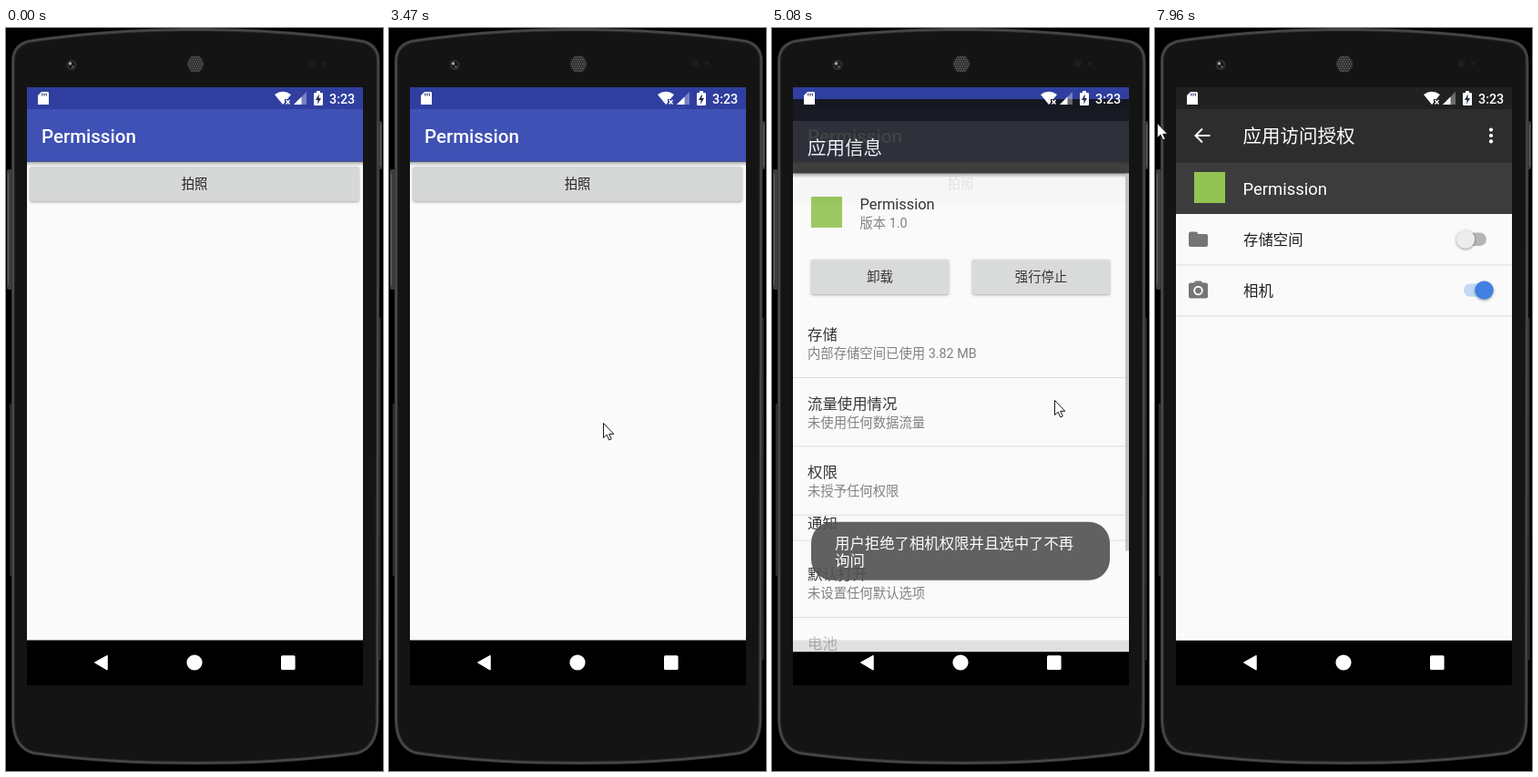
An HTML page with a canvas for the animation above (8000 ms loop, 414 by 815 pixels).

```html
<!DOCTYPE html>
<html lang="zh-CN">
<head>
<meta charset="utf-8">
<title>Permission</title>
<style>
html, body { margin: 0; width: 100%; height: 100%; overflow: hidden; background: #000; }
canvas { display: block; }
</style>
</head>
<body>
<canvas id="stage" width="414" height="815"></canvas>
<script>
const stage = document.getElementById('stage').getContext('2d');
const sheet = document.createElement('canvas');
sheet.width = 414;
sheet.height = 815;
const buffer = sheet.getContext('2d');
let c = stage;

const LOOP = 8000;
const FONT = 'Roboto, "Noto Sans CJK SC", "Noto Sans CJK", sans-serif';
const INK = '#212121', GREY = '#757575', BLUE = '#4285f4', LINK = '#4a82e2', PINK = '#e85587', GREEN = '#92c353';
const BAR = 146.5, FOOT = 671.5;

// Pointer stops: time, x, y
const stops = [
  [70, 346, 674], [690, 200, 170], [1180, 200, 170], [1550, 174, 477], [1780, 134, 422],
  [2060, 121, 398], [2200, 121, 398], [2500, 205, 437], [2830, 307, 432], [2950, 307, 432],
  [3150, 235, 433], [3600, 235, 433], [4140, 310, 408], [5300, 310, 408], [6020, 167, 474],
  [6660, 167, 474], [7230, 345, 290], [7380, 345, 290], [7540, 312, 321], [7940, 2, 104]
];
const clicks = [[730, 980], [2080, 2230], [3160, 3310], [4310, 4450], [6030, 6200], [7250, 7400]];

const clamp = v => Math.max(0, Math.min(1, v));
const ramp = (t, a, b) => clamp((t - a) / (b - a));
const easeOut = p => 1 - (1 - p) * (1 - p);
const smooth = p => p * p * (3 - 2 * p);

function rect(x, y, w, h, color) {
  c.fillStyle = color;
  c.fillRect(x, y, w, h);
}
function pill(x, y, w, h, r, color) {
  c.fillStyle = color;
  c.beginPath();
  c.roundRect(x, y, w, h, r);
  c.fill();
}
function disc(x, y, r, color) {
  c.fillStyle = color;
  c.beginPath();
  c.arc(x, y, r, 0, 7);
  c.fill();
}
function poly(points, color) {
  c.beginPath();
  points.forEach(([x, y]) => c.lineTo(x, y));
  c.closePath();
  c.fillStyle = color;
  c.fill();
}
function line(points, color, width) {
  c.beginPath();
  points.forEach(([x, y]) => c.lineTo(x, y));
  c.strokeStyle = color;
  c.lineWidth = width;
  c.stroke();
}
// Text placed by the middle of its capitals
function text(s, x, cy, size, color, weight = 400, align = 'left') {
  c.font = `${weight} ${size}px ${FONT}`;
  c.textAlign = align;
  c.fillStyle = color;
  c.fillText(s, x, cy + size * .37);
}
// Draws a group and fades it as one sheet
function layer(alpha, draw) {
  if (alpha <= 0) return;
  c = alpha < 1 ? buffer : stage;
  if (c === buffer) c.clearRect(0, 0, 414, 815);
  c.save();
  draw();
  c.restore();
  c = stage;
  if (alpha < 1) {
    c.globalAlpha = alpha;
    c.drawImage(sheet, 0, 0);
    c.globalAlpha = 1;
  }
}
function shadowed(blur, dy, alpha, draw) {
  c.save();
  c.shadowColor = `rgba(0,0,0,${alpha})`;
  c.shadowBlur = blur;
  c.shadowOffsetY = dy;
  draw();
  c.restore();
}
function barShadow() {
  const g = c.createLinearGradient(0, BAR, 0, BAR + 5);
  g.addColorStop(0, 'rgba(0,0,0,.34)');
  g.addColorStop(1, 'rgba(0,0,0,0)');
  rect(23, BAR, 369, 5, g);
}
function button(x, y, w, h, label) {
  shadowed(3, 1, .35, () => pill(x, y, w, h, 2, '#d6d7d7'));
  text(label, x + w / 2, y + h / 2, 14.35, INK, 400, 'center');
}

function shell(inset) {
  const l = 6 + inset, r = 410.5 - inset, top = inset, b = 808 - inset;
  c.beginPath();
  c.moveTo(l, 36);
  c.quadraticCurveTo(l, 18 + top, 24, 13 + top);
  c.bezierCurveTo(85, 4 + top, 140, top, 208, top);
  c.bezierCurveTo(276, top, 332, 4 + top, 393, 13 + top);
  c.quadraticCurveTo(r, 18 + top, r, 36);
  c.lineTo(r - 1, 760);
  c.quadraticCurveTo(r - 2, b - 17, 386, b - 11);
  c.bezierCurveTo(330, b - 3, 270, b, 208, b);
  c.bezierCurveTo(146, b, 86, b - 3, 30, b - 11);
  c.quadraticCurveTo(l + 1, b - 17, l, 760);
  c.closePath();
}
function phone() {
  rect(0, 0, 414, 815, '#000');
  pill(1, 155, 6, 132, 2, '#3c3c3c');
  rect(2, 160, 1, 122, '#626262');
  pill(408, 102, 5, 53, 2, '#3c3c3c');
  rect(411, 106, 1, 46, '#5c5c5c');
  rect(4, 412, 2, 189, '#2c2c2c');
  rect(410, 318, 1.5, 375, '#303030');
  ['#343434', '#4c4c4c', '#444', '#242424', '#141414'].forEach((shade, i) => {
    shell(i);
    c.fillStyle = shade;
    c.fill();
  });

  disc(72, 40.5, 5.5, '#2e3033');
  disc(72, 40.5, 3.6, '#15171a');
  disc(70.5, 39, 1.7, '#a4a8ad');
  disc(73.4, 42.4, 1.2, '#62676d');
  disc(208, 39.5, 9.5, '#2a2a2a');
  for (let j = -3; j <= 3; j++)
    for (let i = -4; i <= 4; i++) {
      const x = i * 2.6 + (j & 1) * 1.3, y = j * 2.5;
      if (Math.hypot(x, y) < 9) disc(208 + x, 39.5 + y, .8, '#777');
    }
  disc(336, 39, 4, '#1f1c1c');
  disc(349, 39, 2.4, '#1f1c1c');
}

function camera(x, y, w, color, hole) {
  const h = w * .9, m = x + w / 2, cy = y + h * .555;
  pill(x, y + h * .11, w, h * .89, w * .09, color);
  poly([[x + w * .25, y + h * .12], [x + w * .35, y], [x + w * .65, y], [x + w * .75, y + h * .12]], color);
  disc(m, cy, w * .25, hole);
  disc(m, cy, w * .16, color);
}

function statusIcons() {
  poly([[39, 70], [46, 70], [47, 71], [47, 84], [35, 84], [35, 74]], '#fff');
  for (let i = 0; i < 3; i++) rect(39.2 + i * 2.3, 71.5, 1.1, 3, '#333c70');

  c.fillStyle = '#fff';
  c.beginPath();
  c.moveTo(304, 84);
  c.lineTo(295, 73);
  c.quadraticCurveTo(304, 66.5, 313, 73);
  c.lineTo(309, 78);
  c.lineTo(306, 78);
  c.lineTo(306, 82);
  c.fill();
  line([[307.5, 79], [311.5, 83.5]], '#fff', 1.3);
  line([[311.5, 79], [307.5, 83.5]], '#fff', 1.3);

  poly([[330, 70], [330, 84], [316, 84]], 'rgba(255,255,255,.35)');
  poly([[324.5, 75.5], [324.5, 84], [316, 84]], '#fff');

  pill(338, 71, 10, 14, 1.2, '#fff');
  rect(341, 69, 4, 2.5, '#fff');
  poly([[343.7, 72.5], [340, 79], [342.5, 79], [342.2, 83.5], [346, 77], [343.6, 77]], '#222b50');
  text('3:23', 355, 77.3, 14.35, '#fff', 500);
}
function navIcons() {
  poly([[97, 696], [111.5, 688], [111.5, 704.5]], '#fff');
  line([[97.5, 696], [111, 688.5], [111, 704], [97.5, 696]], '#fff', 1);
  disc(207, 696, 8.6, '#fff');
  pill(302, 688.3, 15.6, 15.6, 1.5, '#fff');
}

// Status bar, title bar and paper shared by two screens
function scene(status, bar, title, weight) {
  rect(23, 65, 369, 24, status);
  rect(23, BAR, 369, FOOT - BAR, '#fafafa');
  rect(23, 89, 369, BAR - 89, bar);
  barShadow();
  text(title, 39, 118.4, 20.5, '#fff', weight);
}
function home() {
  scene('#303f9f', '#3f51b5', 'Permission', 500);
  button(26.5, 152, 361, 38, '拍照');
}

function dialog(x, y, w, h, show, dim, body) {
  if (show <= 0) return;
  rect(23, 65, 369, FOOT - 65, `rgba(0,0,0,${dim * show})`);
  layer(show, () => {
    const s = .92 + .08 * easeOut(show), cx = x + w / 2, cy = y + h / 2;
    c.translate(cx, cy);
    c.scale(s, s);
    c.translate(-cx, -cy);
    shadowed(24, 9, .34, () => pill(x, y, w, h, 2, '#fff'));
    body();
  });
}
function askDialog(t) {
  const show = ramp(t, 1000, 1180) * (1 - ramp(t, 3280, 3450));
  const checked = ramp(t, 2200, 2330);
  dialog(59.5, 293.5, 295, 173.5, show, .43, () => {
    camera(83, 315, 31, BLUE, '#fff');
    text('要允许', 134, 326, 20.5, INK);
    text('Permission', 195.3, 326.6, 20.5, INK, 700);
    const w = c.measureText('Permission').width;
    text('拍', 195.3 + w, 326, 20.5, INK);
    text('摄照片和录制视频吗?', 134, 350.5, 20.5, INK);
    c.strokeStyle = checked > .5 ? BLUE : GREY;
    c.lineWidth = 2;
    c.beginPath();
    c.roundRect(88, 388.5, 16.5, 16.5, 1);
    c.stroke();
    c.globalAlpha = checked;
    pill(87, 387.5, 18.5, 18.5, 2, BLUE);
    line([[90, 396.8], [94.5, 401.2], [102.8, 392.6]], '#fff', 2);
    c.globalAlpha = 1;
    text('不再询问', 113, 397, 14.35, INK);
    text('拒绝', 226, 438, 14.35, LINK);
    text('允许', 291.5, 438, 14.35, checked > 0 ? '#bdbdbd' : LINK);
  });
}
function deniedDialog(t) {
  const show = ramp(t, 3610, 3800) * (1 - ramp(t, 4430, 4620));
  dialog(48, 321.5, 318, 117.5, show, .6, () => {
    text('相机权限被禁用，您将无法使用相机', 73, 352, 16.4, INK);
    text('进行拍照', 73, 371, 16.4, INK);
    text('取消', 238.5, 411, 14.35, PINK);
    text('去授权', 298.5, 411, 14.35, PINK);
  });
}
function toast(t) {
  layer(ramp(t, 3640, 3900) * (1 - ramp(t, 5480, 5760)), () => {
    pill(43, 541.7, 328, 64, 23, 'rgba(84,84,84,.914)');
    text('用户拒绝了相机权限并且选中了不再', 69, 565, 16.4, '#fff');
    text('询问', 69, 584, 16.4, '#fff');
  });
}

function page(t, start, draw) {
  const p = ramp(t, start, start + 212);
  layer(clamp((t - start) / 118), () => {
    c.beginPath();
    c.rect(23, 65, 369, 655);
    c.clip();
    c.translate(0, Math.round(52 * (1 - easeOut(p))));
    draw(t);
  });
}
function row(title, note, cy) {
  text(title, 39, cy, 16.4, INK);
  if (note) text(note, 39, cy + 21, 14.35, GREY);
}
function appInfo(t) {
  const k = 1 - smooth(ramp(t, 5100, 5330)), up = 19.5 * k;
  const rule = y => rect(23, y, 369, 1, '#dcdcdc');
  c.beginPath();
  c.rect(23, 65, 369, FOOT - 65);
  c.clip();
  scene('#131313', '#2d2d2d', '应用信息', 400);
  rect(43, 172, 34, 34, GREEN);
  text('Permission', 96.5, 180, 16.4, INK);
  text('版本 1.0', 96.5, 200.5, 14.35, GREY);
  button(43, 241, 151, 38, '卸载');
  button(220, 241, 151, 38, '强行停止');
  const press = ramp(t, 6140, 6220) * (1 - ramp(t, 6400, 6600));
  if (press > 0) rect(23, 446, 369, 75, `rgba(0,0,0,${.08 * press})`);
  row('存储', '内部存储空间已使用 3.82 MB', 323);
  rule(370);
  row('流量使用情况', '未使用任何数据流量', 398.5);
  rule(445.3);
  row('权限', '未授予任何权限', 474);
  rule(520.7);
  row('通知', '', 549.5 - up);
  rule(576.6 - 28 * k);
  row('默认打开', '未设置任何默认选项', 605.5 - up);
  rule(652.6 - up);
  text('电池', 39, 681 - up, 16.4, k > 0 ? '#bbb' : INK);
  rect(388, 147, 4, 413.5, '#bdbdbd');
}

function toggle(y, p) {
  const mix = (a, b) => a + (b - a) * p;
  const shade = (a, b) => `rgb(${a.map((v, i) => mix(v, b[i])).join()})`;
  pill(339, y - 7.2, 25, 14.4, 7.2, shade([181, 181, 181], [193, 216, 247]));
  shadowed(3, 1, .4, () => disc(mix(341, 361.5), y, 10.2, shade([236, 236, 236], [66, 128, 228])));
}
function access(t) {
  rect(23, 65, 369, 24, '#212121');
  rect(23, 89, 369, 59, '#2d2d2d');
  rect(23, 148, 369, 56, '#3c3c3c');
  rect(23, 204, 369, FOOT - 204, '#fafafa');
  line([[60.5, 118], [45, 118]], '#fff', 2);
  line([[52, 110.5], [44.5, 118], [52, 125.5]], '#fff', 2);
  text('应用访问授权', 96.5, 118.4, 20.5, '#fff');
  for (let i = -1; i <= 1; i++) disc(369, 118 + i * 6.4, 2.1, '#fff');
  rect(43, 158, 34, 34, GREEN);
  text('Permission', 96.5, 176, 18.45, '#fff');

  pill(37, 226, 21, 14, 2, GREY);
  pill(37, 223.5, 10, 7, 2, GREY);
  text('存储空间', 97, 232, 16.4, INK);
  toggle(231.8, 0);
  rect(23, 259.5, 369, 1, '#dcdcdc');
  camera(37, 277.5, 21, GREY, '#fafafa');
  text('相机', 97, 288, 16.4, INK);
  toggle(287.6, smooth(ramp(t, 7350, 7600)));
  rect(23, 315.5, 369, 1, '#dcdcdc');
}

function pointer(t) {
  if (t < stops[0][0]) return;
  let i = 0;
  while (i < stops.length - 2 && t >= stops[i + 1][0]) i++;
  const [t0, x0, y0] = stops[i], [t1, x1, y1] = stops[i + 1];
  const p = smooth(ramp(t, t0, t1));
  const x = x0 + (x1 - x0) * p, y = y0 + (y1 - y0) * p;
  if (clicks.some(([a, b]) => t >= a && t < b)) disc(x, y, 15, 'rgba(255,250,70,.7)');
  c.save();
  c.translate(Math.round(x) + .5, Math.round(y) + .5);
  poly([[0, 0], [0, 16], [3.7, 12.7], [6.2, 18.4], [8.8, 17.3], [6.3, 11.8], [11.3, 11.8]], '#fff');
  c.strokeStyle = '#16161c';
  c.lineWidth = 1;
  c.stroke();
  c.restore();
}

function draw(t) {
  phone();
  rect(23, 65, 369, 656, '#000');
  home();
  askDialog(t);
  deniedDialog(t);
  page(t, 4975, appInfo);
  page(t, 6478, access);
  toast(t);
  statusIcons();
  navIcons();
  pointer(t);
}

function tick() {
  draw(performance.now() % LOOP);
  requestAnimationFrame(tick);
}
tick();
</script>
</body>
</html>
```
